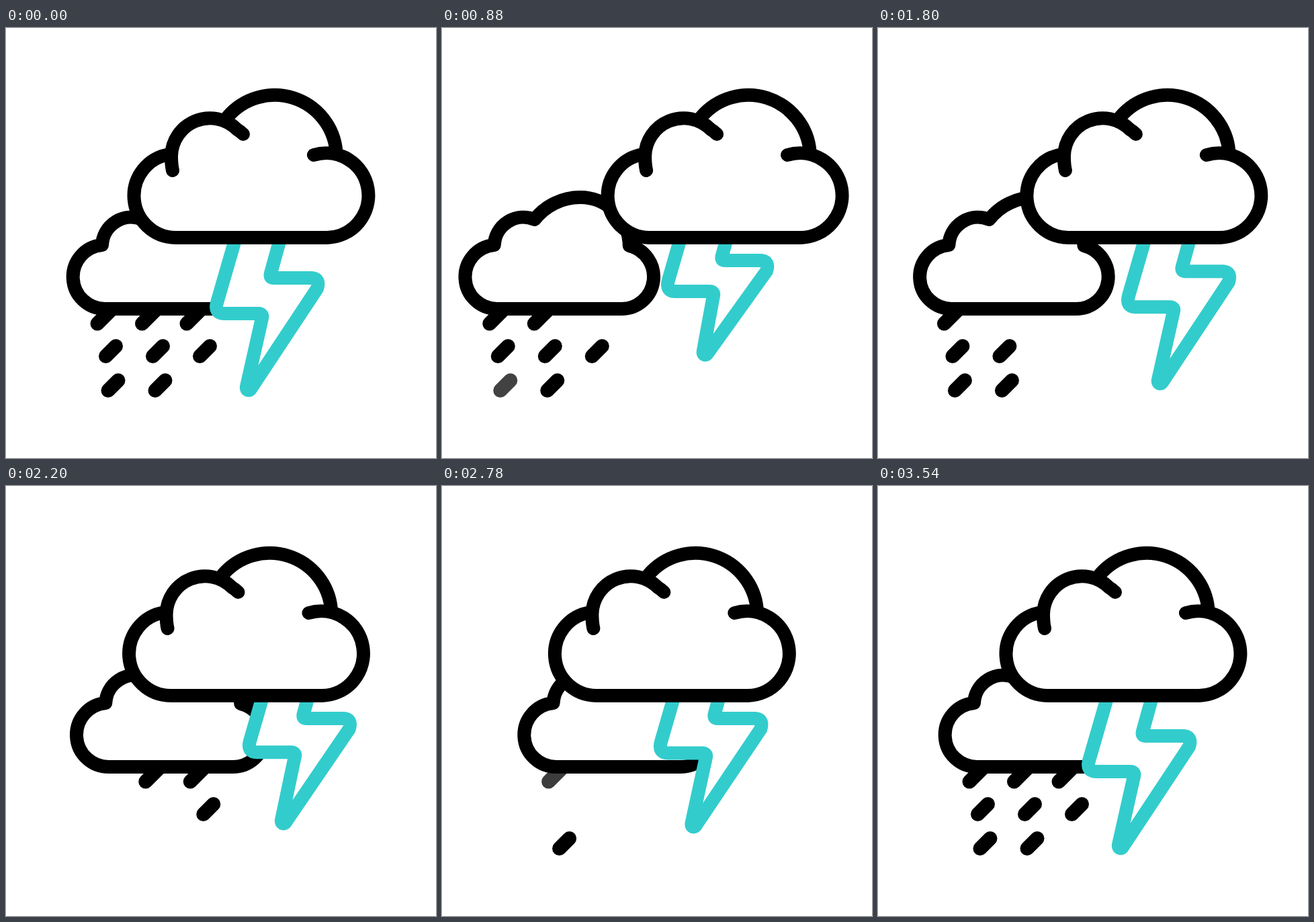
Write an HTML page that moves like this. It is 640 px wide and 640 px high and loops after 3.6 s.

```html
<!DOCTYPE html>
<html lang="en">
<head>
<meta charset="utf-8">
<title>Thunderstorm</title>
<style>
  html, body { margin: 0; width: 100%; height: 100%; overflow: hidden; background: #fff; }
  svg { display: block; width: 100%; height: 100%; }
  path { fill: #fff; stroke: #000; stroke-width: 20; stroke-linecap: round; stroke-linejoin: round; }
  #rain path { stroke-width: 21; }
  #bolt { stroke: #3cc; }
  .fill { stroke: none; }
  .line { fill: none; }
</style>
</head>
<body>
<svg viewBox="0 0 640 640">
  <g id="back">
    <g id="rain"></g>
    <path d="M148 418A47.6 47.6 0 0 1 143 323A43.5 43.5 0 0 1 203 285A86 86 0 0 1 271 252A73 73 0 0 1 344 324A47.7 47.7 0 0 1 332 418Z"/>
  </g>
  <path id="bolt"/>
  <g id="front">
    <path class="fill" d="M252 312A62.4 62.4 0 0 1 243 188A59 59 0 0 1 330 132A92 92 0 0 1 491 184A63 63 0 0 1 478 312Z"/>
    <path class="line" d="M330 132A92 92 0 0 1 491.5 184M248 212Q246 203 246 191A57.5 57.5 0 0 1 344 151Q349 154 353 158M458 189A62.9 62.9 0 1 1 478 312H252A62.4 62.4 0 0 1 243 188"/>
  </g>
</svg>
<script>
const LOOP = 3600;
const BLINK = { period: 1100, hidden: 700, fade: 80, end: 3400 };
const byId = id => document.getElementById(id);
const back = byId('back'), front = byId('front'), bolt = byId('bolt'), rain = byId('rain');

// Keys are [time, value] pairs, eased in and out between neighbours
function track(t, keys) {
  let [t0, v0] = keys[0];
  for (const [t1, v1] of keys) {
    if (t < t1) {
      const u = Math.max(0, (t - t0) / (t1 - t0));
      return v0 + (v1 - v0) * u * u * (3 - 2 * u);
    }
    [t0, v0] = [t1, v1];
  }
  return v0;
}

const sway = (t, apart, together) => track(t, [[0, 0], [1200, apart], [2600, together], [3400, 0]]);
const boltX = t => track(t, [[200, 0], [1850, 59], [3150, 0]]);

// 0: down, 1: raised, 2: raised and squeezed; twice per loop
const LIFT_TIMES = [0, 400, 860, 1200, 1600, 2080, 2360, 2960, 3540];
const LIFT = LIFT_TIMES.map((time, i) => [time, 2 - Math.abs(i % 4 - 2)]);

// Each row of drops: lower left end, spacing, length, first blink per drop
const drops = [
  { x: 136, y: 440, gap: 66.5, size: 21, delays: [920, 1200, 300] },
  { x: 148.5, y: 488.5, gap: 70, size: 15, delays: [1000, 1000, 1400] },
  { x: 152, y: 539.5, gap: 70, size: 15, delays: [860, 1000] }
].flatMap(({ x, y, gap, size, delays }) => delays.map((delay, col) => {
  const el = document.createElementNS('http://www.w3.org/2000/svg', 'path');
  el.setAttribute('d', `M${x + gap * col} ${y}l${size} ${-size}`);
  rain.append(el);
  return { el, delay };
}));

const clamp = v => Math.min(1, Math.max(0, v));

// Drops blink at a steady period; a blink that would end too late is skipped
function dropOpacity(t, delay) {
  const { period, hidden, fade, end } = BLINK;
  const start = delay + Math.floor((t - delay) / period) * period;
  if (t < delay || start + hidden > end) return 1;
  return 1 - clamp((t - start) / fade) + clamp((t - start - hidden) / fade);
}

function boltPath(x, lift) {
  const y = -26 * Math.min(lift, 1), m = Math.max(lift - 1, 0);
  const mover = (dx, dy) => (px, py) => `${px + x + dx * m} ${py + y + dy * m}`;
  const lower = mover(1, -7), upper = mover(1, 0), right = mover(-2, 0), tip = mover(9, -27);
  return `M${lower(345.5, 300)}L${lower(314, 409)}Q${lower(310, 424.5)} ${lower(324, 425)}` +
    `L${lower(375, 425)}Q${lower(383, 425)} ${lower(381, 432)}` +
    `L${tip(358, 534)}C${tip(357, 540)} ${tip(363, 541)} ${tip(365, 536)}` +
    `L${right(463, 388)}Q${right(468, 373)} ${right(455, 372)}` +
    `L${upper(398, 372)}Q${upper(392, 372)} ${upper(394, 365)}L${upper(412, 300)}`;
}

function draw() {
  const t = performance.now() % LOOP;
  front.setAttribute('transform', `translate(${sway(t, 68, -26)})`);
  back.setAttribute('transform', `translate(${sway(t, -79, 26)})`);
  bolt.setAttribute('d', boltPath(boltX(t), track(t, LIFT)));
  for (const { el, delay } of drops) el.setAttribute('opacity', dropOpacity(t, delay));
  requestAnimationFrame(draw);
}
draw();
</script>
</body>
</html>
```
